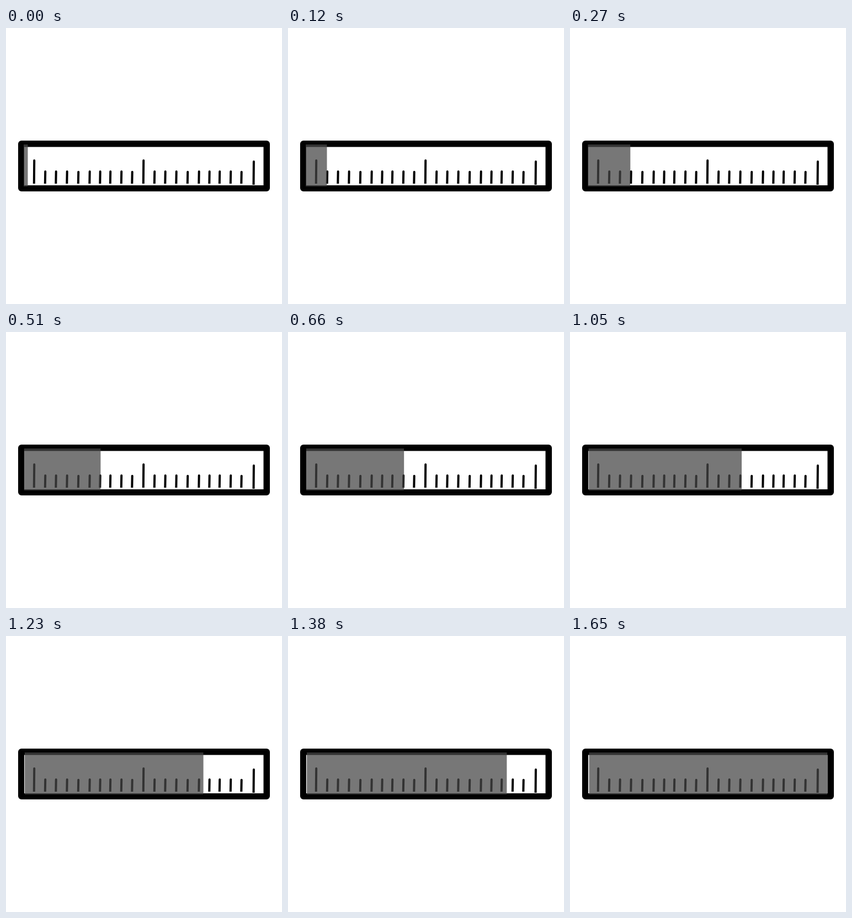
An HTML page for the animation above (1800 ms loop, 500 px wide and 500 px high).

```html
<!DOCTYPE html>
<html lang="en">
<head>
<meta charset="utf-8">
<title>Ruler progress bar</title>
<style>
  html, body { margin: 0; width: 100%; height: 100%; overflow: hidden; background: #fff; }
  svg { display: block; width: 100%; height: 100%; }
</style>
</head>
<body>
<svg viewBox="0 0 500 500">
  <path fill-rule="evenodd" d="M28 204H472a6 6 0 0 1 6 6V290a6 6 0 0 1-6 6H28a6 6 0 0 1-6-6V210a6 6 0 0 1 6-6Z M33 215.5V285H466.5V215.5Z"/>
  <path id="ticks"/>
  <rect id="fill" y="211" height="76" fill="#464646" fill-opacity=".733"/>
</svg>
<script>
  const LOOP = 1800, STEP = 30, LAST = 1650;
  const fill = document.getElementById('fill');

  // A mark with a rounded top and a flat foot, leaning slightly right.
  const tick = (x, top, foot) =>
    `M${x - 2.2} ${foot}L${x - 1.8} ${top + 2}a2 2 0 0 1 4 0L${x + 1.8} ${foot}Z`;

  const offsets = [20, 39.5, 59.5, 80, 100.5, 119.5, 138, 158, 177.5];
  const marks = [tick(51, 238, 282), tick(249, 238, 282), tick(448.7, 240, 284)];
  for (const start of [51, 249]) {
    offsets.forEach((dx, i) => {
      const top = i === 3 || i === 8 ? 258.8 : 258;
      marks.push(tick(start + dx, top, 282));
    });
  }
  document.getElementById('ticks').setAttribute('d', marks.join(''));

  function draw(ms) {
    const time = Math.floor((ms % LOOP) / STEP) * STEP;
    const p = Math.min(time / LAST, 1);
    const left = 32 + 2.5 * p;
    const right = 39.5 + 426.7 * p;
    fill.setAttribute('x', left);
    fill.setAttribute('width', right - left);
  }

  const begin = performance.now();
  function loop() {
    draw(performance.now() - begin);
    requestAnimationFrame(loop);
  }
  loop();
</script>
</body>
</html>
```
